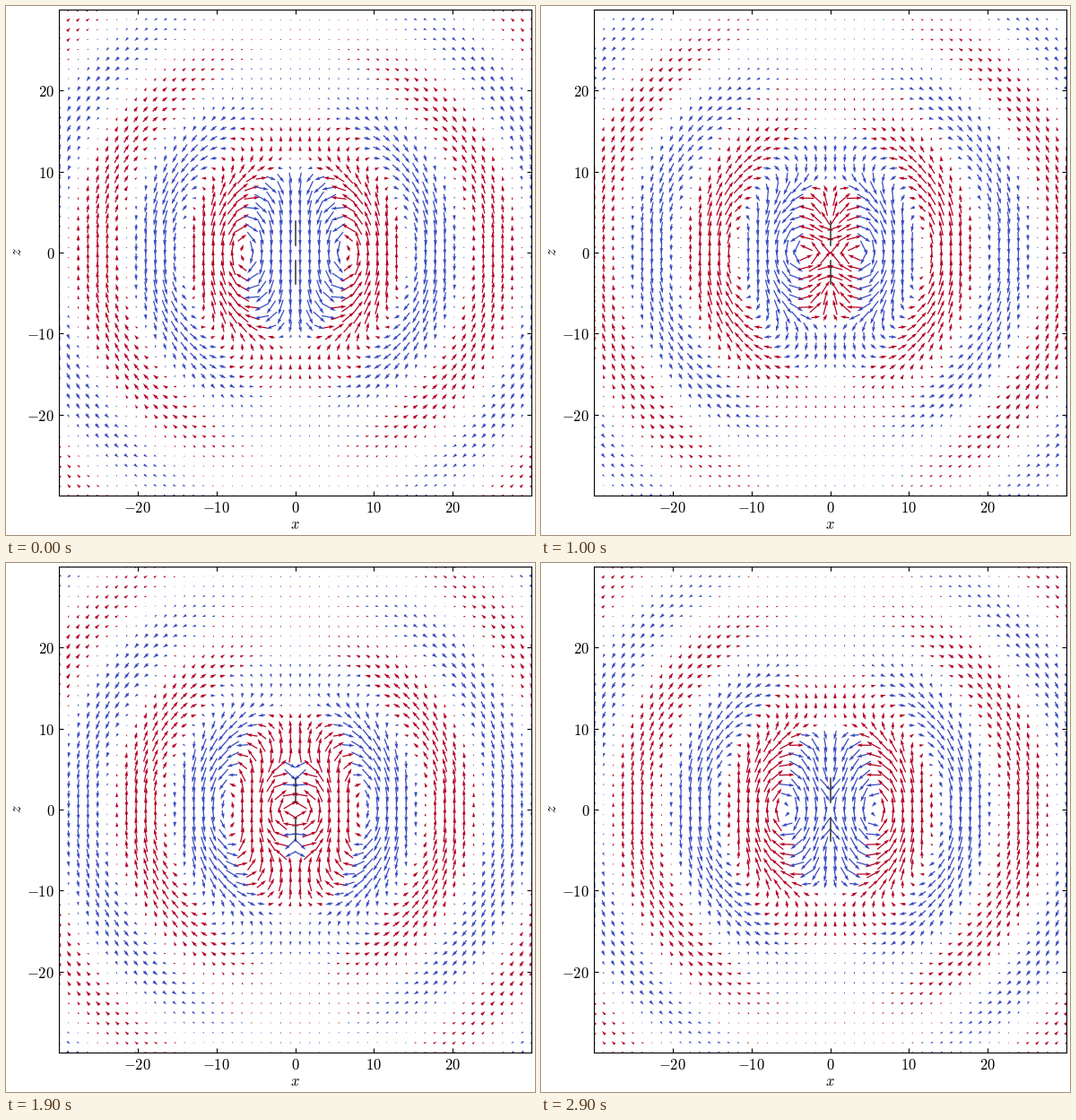
These frames come from a looping animation (590 px wide and 590 px high, 3 s). A matplotlib script:

```python
import numpy as np
import matplotlib.pyplot as plt
from matplotlib.animation import FuncAnimation

SIZE, DPI = 590, 100
FRAMES, INTERVAL = 30, 100
LEFT, RIGHT, TOP, BOTTOM = 59.1, 586.1, 4.1, 546.1
LIMIT = 30
WAVE_NUMBER, ARM = 0.43, 4.0        # ARM is half the antenna length
GAIN, MAX_LENGTH = 150, 17.5        # arrow lengths in pixels
RED, BLUE = "#b40426", "#3b4cc0"

plt.rcParams.update({
    "mathtext.fontset": "cm",
    "font.size": 12,
    "axes.linewidth": 0.8,
    "xtick.direction": "in",
    "ytick.direction": "in",
    "xtick.top": True,
    "ytick.right": True,
})

grid = np.linspace(-LIMIT, LIMIT, 50)
X, Z = np.meshgrid(grid, grid)

# Spherical waves from both tips and the feed point: (position, weight)
SOURCES = [(ARM, 1), (-ARM, 1), (0, -2 * np.cos(WAVE_NUMBER * ARM))]


def antenna_field(phase):
    """Electric field of a thin centre-fed antenna, capped in length."""
    ex, ez = np.zeros_like(X), np.zeros_like(X)
    for z0, weight in SOURCES:
        r = np.hypot(X, Z - z0)
        wave = GAIN * weight * np.sin(phase - WAVE_NUMBER * r) / r
        ez += wave
        ex -= wave * (Z - z0) / X
    shrink = np.minimum(1, MAX_LENGTH / np.hypot(ex, ez))
    return ex * shrink, ez * shrink


fig = plt.figure(figsize=(SIZE / DPI, SIZE / DPI), dpi=DPI, facecolor="white")
ax = fig.add_axes([LEFT / SIZE, 1 - BOTTOM / SIZE,
                   (RIGHT - LEFT) / SIZE, (BOTTOM - TOP) / SIZE])
ax.set_xlim(-LIMIT, LIMIT)
ax.set_ylim(-LIMIT, LIMIT)

ticks = [-20, -10, 0, 10, 20]
labels = [f"${t}$" for t in ticks]
ax.set_xticks(ticks, labels)
ax.set_yticks(ticks, labels)


def axis_label(x, y, text, **kw):
    fig.text(x / SIZE, 1 - y / SIZE, text, ha="center", va="center", **kw)


axis_label(322.5, 578, "$x$")
axis_label(12, 274.5, "$z$", rotation=90)

for side in (-1, 1):
    ax.plot([0, 0], [side * 0.95, side * 3.85], color="#333333", lw=1.1, zorder=3)

arrows = ax.quiver(X, Z, *antenna_field(0), pivot="mid", angles="uv",
                   scale_units="dots", scale=1, zorder=2)


def update(i):
    ex, ez = antenna_field(2 * np.pi * i / FRAMES)
    arrows.set_UVC(ex, ez)
    arrows.set_facecolor(np.where(ez.ravel() > 0, RED, BLUE))
    return (arrows,)


anim = FuncAnimation(fig, update, frames=FRAMES, interval=INTERVAL,
                     repeat=True, repeat_delay=0)
plt.show()
```
